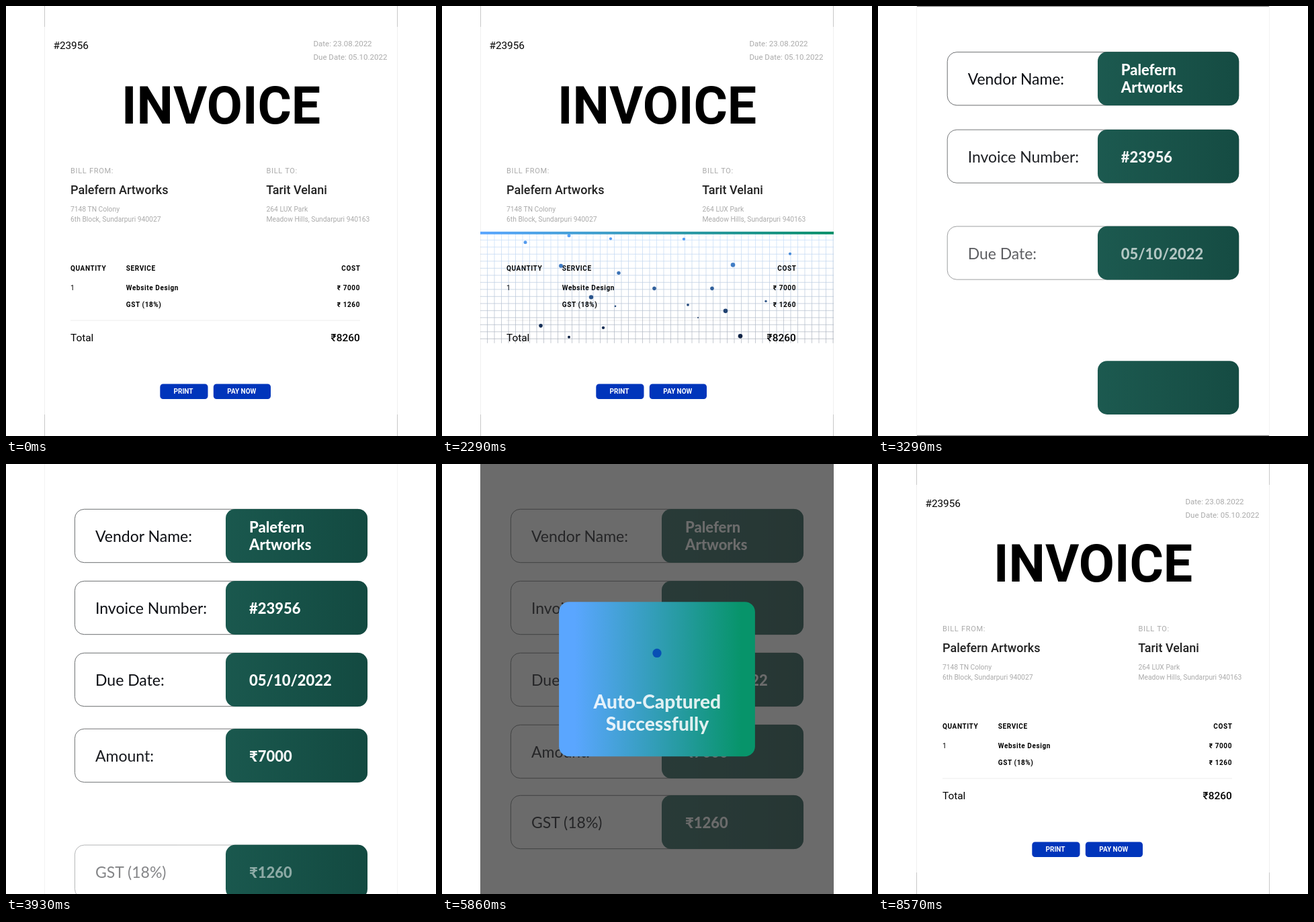
These frames come from a looping animation (640x640 px, 8.64 s). An HTML page:

```html
<!DOCTYPE html>
<html lang="en">
<head>
<meta charset="utf-8">
<title>Invoice capture</title>
<style>
html, body { margin: 0; width: 100%; height: 100%; overflow: hidden; background: #fff; }
svg { display: block; width: 100vw; height: 100vh; }
text { white-space: pre; }
.inv { font-family: Roboto, Arial, sans-serif; }
.mut { fill: #aaa; }
.cap { font-size: 11px; letter-spacing: .7px; }
.name { font-size: 18px; font-weight: 500; fill: #222; }
.addr { font-size: 10.3px; }
.row { font-size: 10px; font-weight: 700; letter-spacing: .6px; }
.btn { font-size: 10px; font-weight: 700; fill: #fff; }
.card { font-family: Lato, "Noto Sans", sans-serif; font-size: 23px; fill: #0d0f14; }
.val { font-size: 22px; font-weight: 800; fill: #fff; }
.done { font-family: Lato, "Noto Sans", sans-serif; font-size: 33.6px; font-weight: 800; fill: #fff; text-anchor: middle; }
</style>
</head>
<body>
<svg viewBox="0 0 640 640">
  <defs>
    <linearGradient id="beam"><stop stop-color="#5aa6ff"/><stop offset="1" stop-color="#088f68"/></linearGradient>
    <linearGradient id="pop"><stop offset=".08" stop-color="#5aa6ff"/><stop offset=".93" stop-color="#07946a"/></linearGradient>
    <linearGradient id="green"><stop stop-color="#1a584e"/><stop offset="1" stop-color="#134a41"/></linearGradient>
    <linearGradient id="depth" gradientUnits="userSpaceOnUse" x1="0" y1="0" x2="0" y2="164">
      <stop stop-color="#58a6ff"/><stop offset="1" stop-color="#0a1a38"/>
    </linearGradient>
    <clipPath id="page"><rect x="57" width="526" height="640"/></clipPath>
    <clipPath id="sheet"><rect x="55" width="530" height="640"/></clipPath>
  </defs>
  <g clip-path="url(#page)">
    <g id="invoice" class="inv">
      <rect x="57" width="526" height="640" fill="#fff"/>
      <path d="M57.5 30V608M582.5 30V608" stroke="#efefef"/>
      <path d="M57.5 0V31M582.5 0V31M57.5 608V640M582.5 608V640" stroke="#c8c8c8"/>
      <text x="70.5" y="64" font-size="15.3">#23956</text>
      <g class="mut" font-size="11.5">
        <text x="457.5" y="60">Date: 23.08.2022</text>
        <text x="457.5" y="79.5">Due Date: 05.10.2022</text>
      </g>
      <text x="172" y="174.5" font-size="77" font-weight="700">INVOICE</text>
      <text class="mut cap" x="96" y="249">BILL FROM:</text>
      <text class="mut cap" x="387.5" y="249">BILL TO:</text>
      <text class="name" x="96" y="279.5">Palefern Artworks</text>
      <text class="name" x="387.3" y="279.5">Tarit Velani</text>
      <g class="mut addr">
        <text x="96" y="305.5">7148 TN Colony</text>
        <text x="96" y="321">6th Block, Sundarpuri 940027</text>
        <text x="387.5" y="305.5">264 LUX Park</text>
        <text x="387.5" y="321">Meadow Hills, Sundarpuri 940163</text>
      </g>
      <g class="row">
        <text x="96" y="393.7">QUANTITY</text>
        <text x="178.8" y="393.7">SERVICE</text>
        <text x="178.8" y="422.7">Website Design</text>
        <text x="178.8" y="448">GST (18%)</text>
        <g text-anchor="end">
          <text x="527.5" y="393.7">COST</text>
          <text x="527" y="422.7">₹ 7000</text>
          <text x="527" y="448">₹ 1260</text>
        </g>
      </g>
      <text x="96" y="422.7" font-size="10.3">1</text>
      <path d="M96 468H527" stroke="#ececec"/>
      <text x="96" y="498.7" font-size="15.4">Total</text>
      <text x="526.7" y="498.7" font-size="15.4" font-weight="500" text-anchor="end">₹8260</text>
      <rect x="229.3" y="562.5" width="71.2" height="22.5" rx="4.5" fill="#0035bb"/>
      <rect x="308.8" y="562.5" width="85.2" height="22.5" rx="4.5" fill="#0035bb"/>
      <text class="btn" x="249.6" y="577.4">PRINT</text>
      <text class="btn" x="329.3" y="577.4">PAY NOW</text>
    </g>
    <g id="scan"></g>
    <rect id="shade" x="57" width="526" height="640"/>
    <g id="panel" class="card">
      <rect id="paper" x="55" width="530" height="640" fill="#fff"/>
      <g id="fields" clip-path="url(#sheet)"></g>
    </g>
    <path id="edges" d="M57.5 0V640M582.5 0V640" stroke="#f2f2f2"/>
    <rect id="dim" x="57" width="526" height="640"/>
    <g id="popup">
      <rect x="146" y="183" width="348" height="274.5" rx="18" fill="url(#pop)"/>
      <circle id="disc" cx="320" cy="274" fill="#0850b5"/>
      <path id="tick" d="M304 275L314 285.5L336.5 262.5" pathLength="1" fill="none" stroke="#fff"
        stroke-width="2.6" stroke-linecap="round" stroke-linejoin="round"/>
      <g id="note" class="done">
        <text x="320.5" y="373">Auto-Captured</text>
        <text x="320.5" y="412">Successfully</text>
      </g>
    </g>
    <use id="next" href="#invoice"/>
  </g>
</svg>
<script>
const LOOP = 8640;
const $ = id => document.getElementById(id);
const part = (t, start, length) => Math.min(1, Math.max(0, (t - start) / length));
const out = (p, power = 3) => 1 - (1 - p) ** power;
const set = (el, attrs) => { for (const k in attrs) el.setAttribute(k, attrs[k]); };
const show = (el, on) => { el.style.display = on ? "" : "none"; };
const zoom = s => `translate(320 320) scale(${s}) translate(-320 -320)`;

// Scanner: beam, grid and dots hanging below it
const STEP = 10.5, DEPTH = 164;
const DOTS = [
  [124, 14, 2.5], [189, 4, 2.5], [251, 8.5, 2.1], [360, 9, 2.2], [518, 31, 2.1],
  [177, 49, 3], [433, 47.5, 3.3], [263, 59.5, 2.7], [316, 82.5, 2.8], [402, 82.5, 2.8],
  [222, 95.5, 3.2], [258, 109, 1.3], [366, 107, 1.9], [482, 101.5, 1.7], [422, 116, 3.3],
  [381, 126, 1], [147, 138, 2.8], [240, 141, 2.2], [189, 155, 2], [444, 153.5, 3.3]
];
let grid = "";
for (let x = 57 + STEP; x < 583; x += STEP) grid += `M${x} 0V${DEPTH}`;
for (let y = STEP; y < DEPTH; y += STEP) grid += `M57 ${y}H583`;
$("scan").innerHTML =
  `<path d="${grid}" stroke="url(#depth)" stroke-width=".7" opacity=".34"/>` +
  DOTS.map(([x, y, r]) => `<circle cx="${x}" cy="${y}" r="${r}" fill="url(#depth)"/>`).join("") +
  `<rect x="57" y="-2" width="526" height="4" fill="url(#beam)"/>`;

// Each field: label, value lines, centre, start, length, slide distance
const FIELDS = [
  ["Vendor Name:", ["Palefern", "Artworks"], 107, 2538, 880, 141],
  ["Invoice Number:", ["#23956"], 214, 2768, 880, 141],
  ["Due Date:", ["05/10/2022"], 321, 3020, 880, 141],
  ["Amount:", ["₹7000"], 428, 3357, 880, 141],
  ["GST (18%)", ["₹1260"], 533, 3742, 898, 150]
];
$("fields").innerHTML = FIELDS.map(([label, lines, c]) => {
  const first = c + 9 - (lines.length - 1) * 14.5;
  const value = lines.map((s, i) => `<text class="val" x="362" y="${first + i * 26.7}">${s}</text>`).join("");
  return `<g>
    <g class="fade"><rect x="102.4" y="${c - 39.7}" width="435.2" height="79.4" rx="14" fill="none" stroke="#5c5f61" stroke-width=".9"/>
    <text x="133" y="${c + 9}">${label}</text></g>
    <rect class="box" x="327" y="${c - 40}" width="211" height="80" rx="14" fill="url(#green)"/>
    <g class="fade">${value}</g></g>`;
}).join("");
const rows = [...$("fields").children].map((g, i) => ({
  g, spec: FIELDS[i], box: g.querySelector(".box"), fades: g.querySelectorAll(".fade")
}));

function drawScan(t) {
  const down = t < 1590;
  const y = down ? 608 + (t - 1290) * .667 : 338.5 - (t - 2290) * .667;
  show($("scan"), t > 376 && t < 2760);
  set($("scan"), {
    transform: `translate(0 ${y}) scale(1 ${down ? -1 : 1})`,
    opacity: 1 - part(t, 2530, 220)
  });
}

function drawPanel(t) {
  const grow = out(part(t, 2530, 900));
  set($("shade"), { opacity: grow * .5 });
  show($("panel"), grow > 0);
  set($("panel"), { transform: zoom(grow) });
  set($("paper"), { opacity: Math.min(1, grow * 1.21) });
  show($("edges"), grow > .98);
  for (const { g, spec, box, fades } of rows) {
    const [, , , start, length, dist] = spec;
    const p = out(part(t, start, length));
    set(g, { transform: `translate(0 ${(1 - p) * dist})` });
    set(box, { opacity: grow ** 2.55 });
    fades.forEach(f => set(f, { opacity: p }));
  }
}

function drawPopup(t) {
  const dark = out(part(t, 5530, 900));
  const shade = Math.max(0, Math.round(65 - 71 * (1 - dark)));
  set($("dim"), { fill: `rgb(${shade},${shade},${shade})`, opacity: dark * .95 });
  const grow = out(part(t, 5530, 727));
  show($("popup"), grow > 0);
  set($("popup"), { transform: zoom(grow) });
  set($("note"), { opacity: part(t, 5560, 350) });
  const swell = Math.sin(part(t, 5800, 650) * Math.PI / 2);
  const settle = out(part(t, 6470, 430));
  set($("disc"), { r: 54 * swell - 18 * settle });
  const draw = part(t, 6780, 420);
  show($("tick"), draw > 0);
  set($("tick"), { "stroke-dasharray": `${draw} 2` });
}

function drawNext(t) {
  const grow = out(part(t, 7752, 818), 2);
  show($("next"), grow > 0);
  set($("next"), { transform: zoom(grow) });
}

function frame() {
  const t = performance.now() % LOOP;
  drawScan(t);
  drawPanel(t);
  drawPopup(t);
  drawNext(t);
  requestAnimationFrame(frame);
}
frame();
</script>
</body>
</html>
```
